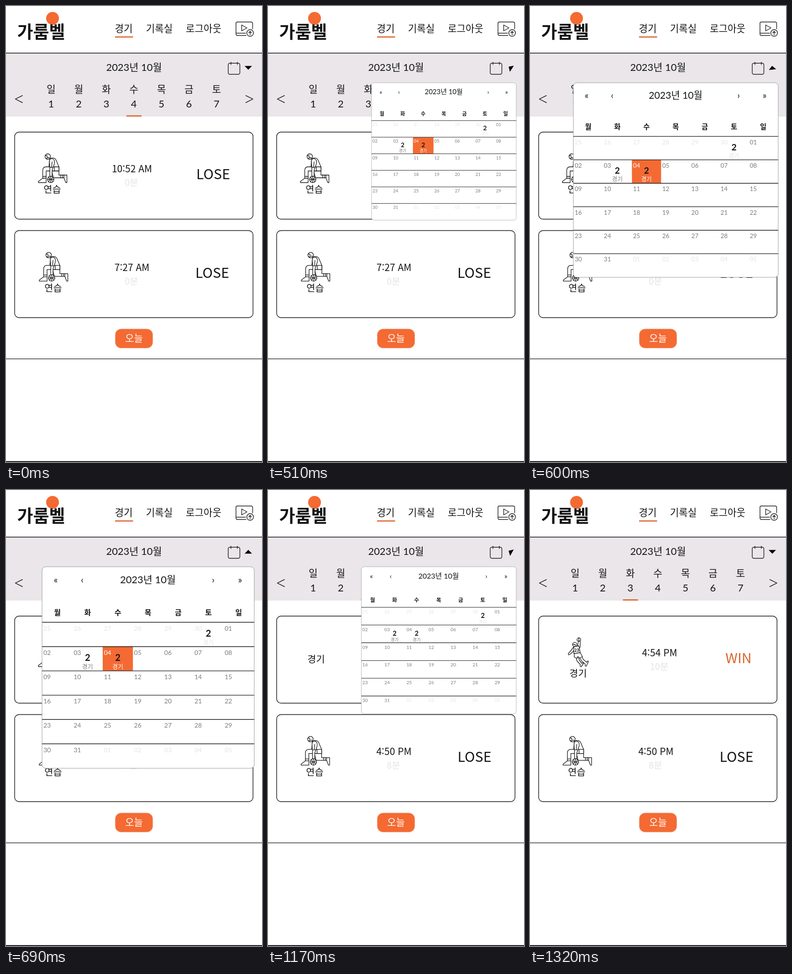
An HTML page that plays this animation: 561 by 998 pixels, repeating every 2.01 s.

```html
<!DOCTYPE html>
<html lang="ko">
<head>
<meta charset="utf-8">
<title>경기 일정</title>
<style>
  html, body { margin: 0; width: 100%; height: 100%; overflow: hidden; background: #fff; }
  svg { display: block; width: 100%; height: 100%; }
  text { font-family: "Noto Sans CJK KR", "Noto Sans CJK", sans-serif; font-weight: 350; fill: #151515; text-anchor: middle; }
  .ui { font-family: Lato, "Noto Sans CJK KR", sans-serif; font-weight: 400; }
  .bold { font-weight: 700; }
  .logo { font-weight: 900; }
  .start { text-anchor: start; }
  .line { fill: none; stroke: #1c1a1c; stroke-width: 1.4; stroke-linecap: round; stroke-linejoin: round; }
  .figure { fill: #fff; stroke: #151515; stroke-width: 1.3; stroke-linejoin: round; stroke-linecap: round; }
</style>
</head>
<body>
<svg id="stage" viewBox="0 0 561 998">
  <defs>
    <g id="dribbler" class="figure">
      <path d="M30 38 L46 29 V47 H63.5 V63.5 H61 L57 53 H34 Z"/>
      <path d="M26 11 Q37 7 40 15 L46 29 V38 H24 V29 Z"/>
      <path d="M46 29 H18 Q10.5 29 10.5 37 V54 L1 61 V63.5 H18 V38 H46 Z"/>
      <path d="M10.5 50 H18 M10.5 54 H18 M36 29 V38 M50 47 V53 M54 47 V53 M57 53 V47" fill="none"/>
      <circle cx="21.5" cy="6.5" r="6"/>
      <path d="M16 4.5 H20 V9 H25 M17 10 L20 11" fill="none"/>
      <path d="M25 19 Q25 10 31 11 Q38 13 36 22 L31 37 V49 Q28.500 53 26 49 V30 Z"/>
      <path d="M31 18 L30 30 M26 30 H32" fill="none"/>
      <circle cx="28" cy="56.5" r="7"/>
      <path d="M21 56.5 H35 M28 49.5 V63.5 M23 51.5 Q29 56.5 23 61.5 M33 51.5 Q27 56.5 33 61.5" fill="none"/>
    </g>
    <g id="dunker" class="figure">
      <path d="M21 20 L23 8 L27 7 L27 20 L24 27 Z"/>
      <path d="M13 20 L7 28 L1 35 L1.500 38 L4 37 L10 32 L15 26 Z"/>
      <path d="M25 42 L30 41 L34 48 L41 54 L44 51 L45 53 L40 63 L38 62 L38 58 L30 51 Z"/>
      <path d="M17 41 L23 41 L25 49 L30 56 L34 55 L34 57 L29 64 L27 63 L27 59 L20 51 Z"/>
      <path d="M14 34 L27 33 L32 42 L24 45 L22 41 L21 45 L14 43 Z"/>
      <path d="M13 20 L24 18 L27 33 L13 35 Z"/>
      <circle cx="15" cy="15" r="4.7"/>
      <path d="M11 15 H16 V18 M22 1 Q27 -1 28 4 Q28 8 24 8 Q20 8 20 4 Z M24 1 V8"/>
      <text class="bold" x="19.5" y="30.500" font-size="9" stroke="none">23</text>
    </g>
  </defs>
</svg>
<script>
const LOOP = 2010, STEP = 30;
const OPEN = 480, OPENED = 690, PICK = 1170, IMAGE_READY = 1260, CLOSED = 1320;
const DECAY = 0.477;
const ORANGE = '#f46a32', ACCENT = '#d9662f', GRAY = '#7b7b7b', FAINT = '#e4e4e4';
const stage = document.getElementById('stage');

const attrs = o => Object.entries(o).map(([k, v]) => `${k}="${v}"`).join(' ');
const text = (s, x, y, size, more = {}) =>
  `<text ${attrs({ x, y, 'font-size': size, ...more })}>${s}</text>`;
const ui = (s, x, y, size, more = {}) => text(s, x, y, size, { class: 'ui', ...more });
const rect = (x, y, width, height, more = {}) => `<rect ${attrs({ x, y, width, height, ...more })}/>`;
const path = (d, more = {}) => `<path ${attrs({ d, class: 'line', ...more })}/>`;

function header() {
  return `<circle cx="102" cy="27" r="14" fill="${ORANGE}"/>`
    + text('가룸벨', 77, 70, 38, { class: 'logo' })
    + text('경기', 258, 57, 21.2) + text('기록실', 336, 57, 21.2) + text('로그아웃', 433, 57, 21.2)
    + rect(239, 66.5, 39.5, 2.6, { fill: ACCENT })
    + path('M526 64.500 H507 Q504 64.500 504 61 V38 Q504 35 507 35 H537 Q540.500 35 540.500 38 V50 M504 59.500 H525 M516.500 41.500 L528 48 L516.500 54.500 Z')
    + '<circle class="line" cx="535" cy="59" r="7.3"/>'
    + path('M535 63 V55.5 M532 58.5 L535 55.5 L538 58.5')
    + rect(0, 102.3, 561, 1.6, { fill: '#1c1a1c' });
}

function weekStrip() {
  const days = [...'일월화수목금토'].map((day, i) => {
    const x = 99 + 60.4 * i;
    return ui(day, x, 190, 21.5) + ui(i + 1, x, 222, 22);
  }).join('');
  return rect(0, 104, 561, 138, { fill: '#eae6ea' })
    + ui('2023년 10월', 280.5, 142, 21.9)
    + rect(487, 125.3, 25.5, 24.2, { rx: 3.5, class: 'line' })
    + path('M493 123 V128 M507 123 V128')
    + '<path id="arrow" d="M-8 -4 H8 L0 4.3 Z"/>'
    + path('M36 196 L20.5 203.7 L36 211.5 M525.5 196 L541 203.7 L525.5 211.5')
    + days + rect(0, 239.3, 33, 2.7, { id: 'dayMark', fill: ACCENT });
}

const cardFrame = y => rect(17.5, y - 1.5, 526, 193.5, { fill: 'none', stroke: '#f3f3f3' })
  + rect(19, y, 522.3, 190.5, { rx: 9.5, class: 'line', 'stroke-width': 1.3 });

function card(top, c) {
  const figure = c.figure
    ? `<use ${attrs({ href: '#' + c.figure, x: c.figureX, y: top + 47, id: c.id || '' })}/>` : '';
  return figure
    + text(c.kind, c.kindX, top + 133, 20.8, c.id ? { id: c.id + 'Label' } : {})
    + text(c.time, c.timeX, top + 88, 21)
    + text(c.length, c.timeX - 1, top + 118, 20, { style: `fill:${FAINT}` })
    + text(c.result, c.resultX, top + 103, 30.3, c.result === 'WIN' ? { style: `fill:${ACCENT}` } : {});
}

function games(id, first, second) {
  return `<g id="${id}">${card(276, first)}${card(491.7, second)}</g>`;
}

const practice = (figureX, kindX, time, length, resultX) =>
  ({ figure: 'dribbler', figureX, kind: '연습', kindX, time, timeX: 276, length, result: 'LOSE', resultX });

function calendar() {
  const left = 79.5, top = 289.5, w = 66.2, h = 53.2;
  const column = i => left + w * (i % 7), row = i => top + h * Math.floor(i / 7);
  const cell = (i, id) => rect(column(i), row(i), w, h, { id, fill: ORANGE });
  const gameDays = [5, 8, 9];
  let out = rect(79, 168, 465, 441, { rx: 8, fill: '#fff' }) + cell(8, 'cell3') + cell(9, 'cell4');
  out += ui('2023년 10월', 311, 204, 21.9);
  [['«', 109], ['‹', 167], ['›', 454], ['»', 513]].forEach(([s, x]) => out += ui(s, x, 204, 21));
  [...'월화수목금토일'].forEach((s, i) => out += ui(s, column(i) + w / 2, 273.5, 16, { class: 'ui bold' }));
  for (let r = 0; r < 6; r++) out += path(`M79 ${top + h * r} H544`, { 'stroke-width': 1.2 });
  for (let i = 0; i < 42; i++) {
    const inMonth = i > 5 && i < 37;
    const day = i < 6 ? 25 + i : inMonth ? i - 5 : i - 36;
    const style = `fill:${inMonth ? GRAY : FAINT}`;
    const mark = i === 9 ? 'picked' : '';
    out += ui(String(day).padStart(2, '0'), column(i) + 2.5, row(i) + 18, 14,
      { class: `ui start ${mark}`, style });
    if (gameDays.includes(i)) {
      out += ui(2, column(i) + w / 2, row(i) + 31.5, 20, { class: 'ui bold' })
        + ui('경기', column(i) + w / 2, row(i) + 48, 13, { class: `ui ${mark}`, style });
    }
  }
  return `<g id="calendar">${out}${rect(79, 168, 465, 441, { rx: 8, fill: 'none', stroke: '#999' })}</g>`;
}

stage.insertAdjacentHTML('beforeend', header() + weekStrip()
  + cardFrame(276) + cardFrame(491.5)
  + games('wednesday',
    practice(70, 101.5, '10:52 AM', '0분', 454),
    practice(72, 103.5, '7:27 AM', '0분', 452))
  + games('tuesday',
    { id: 'match', figure: 'dunker', figureX: 83, kind: '경기', kindX: 105.5, time: '4:54 PM',
      timeX: 284, length: '10분', result: 'WIN', resultX: 457 },
    practice(71.5, 102.5, '4:50 PM', '8분', 452.5))
  + rect(239.3, 706.8, 82.4, 42, { rx: 13, fill: ORANGE, stroke: '#f3b69e', 'stroke-width': 0.8 })
  + text('오늘', 280.5, 734.5, 21.2, { style: 'fill:#fff' })
  + rect(0, 771.7, 561, 1.3, { fill: '#1c1a1c' }) + rect(0, 996, 561, 2, { fill: '#1c1a1c' })
  + calendar());

const $ = id => document.getElementById(id);
const show = (id, on) => $(id).style.display = on ? '' : 'none';
const pickedTexts = stage.querySelectorAll('.picked');

// Calendar scale: 0 is shut, 1 is open.
function openness(t) {
  if (t < OPEN || t >= CLOSED) return 0;
  if (t < OPENED) return 1 - 0.667 * DECAY ** ((t - OPEN) / STEP);
  if (t < PICK) return 1;
  return 0.73 * DECAY ** ((t - PICK) / STEP);
}

function draw(t) {
  const p = openness(t), picked = t >= PICK, ready = t >= IMAGE_READY;
  const turn = picked ? p ** 1.3 : p;
  show('calendar', p > 0);
  $('calendar').setAttribute('transform', `translate(544 168) scale(${p}) translate(-544 -168)`);
  $('arrow').setAttribute('transform', `translate(531 135.2) rotate(${180 * turn})`);
  $('dayMark').setAttribute('x', picked ? 203.7 : 264);
  show('wednesday', !picked);
  show('tuesday', picked);
  show('match', ready);
  $('matchLabel').setAttribute('y', ready ? 409 : 377.5);
  $('cell4').setAttribute('opacity', picked ? 0 : 1);
  $('cell3').setAttribute('opacity', Math.max(0, Math.min(1, (t - PICK) / 120)));
  pickedTexts.forEach(e => e.style.fill = picked ? GRAY : '#fff');
}

const start = performance.now();
function tick() {
  const t = (performance.now() - start) % LOOP;
  draw(Math.floor(t / STEP) * STEP);
  requestAnimationFrame(tick);
}
tick();
</script>
</body>
</html>
```
